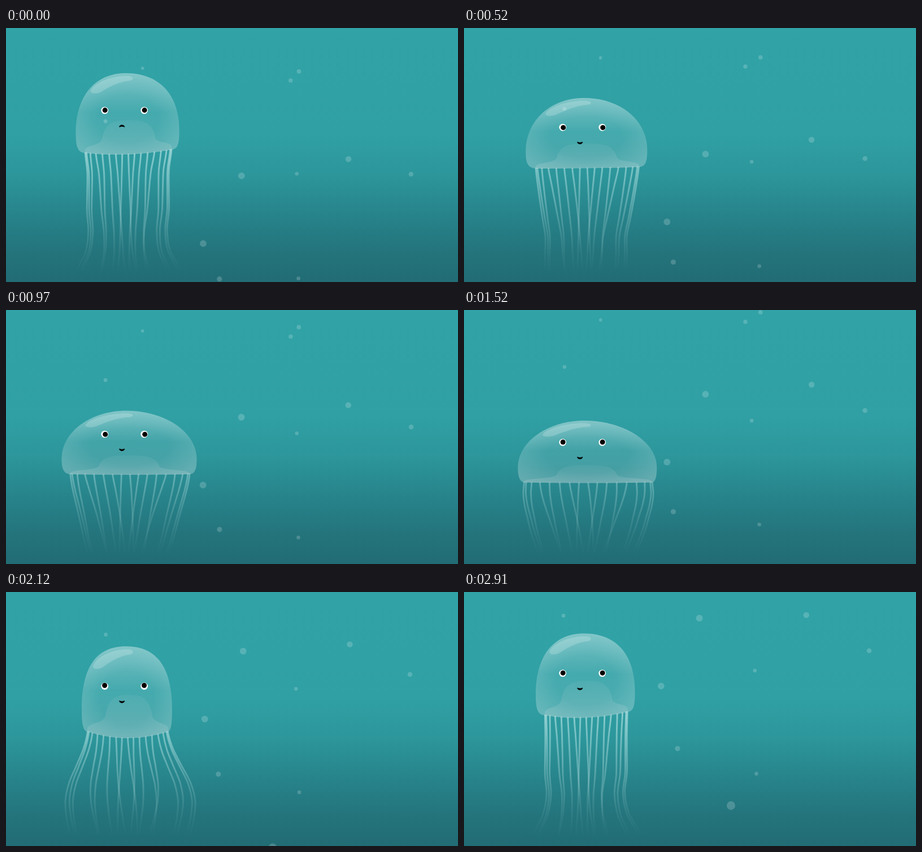
An HTML page that plays this animation: 800x450 px, repeating every 2940 ms.

```html
<!DOCTYPE html>
<html lang="en">
<head>
<meta charset="utf-8">
<title>Jellyfish</title>
<style>
  html, body { margin: 0; width: 100%; height: 100%; overflow: hidden; background: #2f9fa4; }
  svg { display: block; width: 100%; height: 100%; }
</style>
</head>
<body>
<svg viewBox="0 0 800 450">
  <defs>
    <linearGradient id="sea" x2="0" y2="1">
      <stop offset="0" stop-color="#31a3a7"/>
      <stop offset=".42" stop-color="#30a0a4"/>
      <stop offset=".58" stop-color="#2c969b"/>
      <stop offset=".74" stop-color="#27838a"/>
      <stop offset=".88" stop-color="#24747c"/>
      <stop offset="1" stop-color="#226c74"/>
    </linearGradient>
    <linearGradient id="dome" x2="0" y2="1">
      <stop offset="0" stop-color="#fff" stop-opacity=".3"/>
      <stop offset=".2" stop-color="#fff" stop-opacity=".23"/>
      <stop offset=".48" stop-color="#fff" stop-opacity=".1"/>
      <stop offset="1" stop-color="#fff" stop-opacity=".14"/>
    </linearGradient>
    <radialGradient id="rim" cx=".5" cy=".56" r=".58">
      <stop offset=".5" stop-color="#fff" stop-opacity="0"/>
      <stop offset="1" stop-color="#fff" stop-opacity=".15"/>
    </radialGradient>
    <linearGradient id="under" x2="0" y2="1">
      <stop offset="0" stop-color="#f4e8ea" stop-opacity=".05"/>
      <stop offset="1" stop-color="#f4e8ea" stop-opacity=".16"/>
    </linearGradient>
    <linearGradient id="fade" gradientUnits="userSpaceOnUse" x1="0" y1="210" x2="0" y2="435">
      <stop offset="0" stop-color="#d4f4f4" stop-opacity=".55"/>
      <stop offset=".4" stop-color="#d4f4f4" stop-opacity=".32"/>
      <stop offset=".67" stop-color="#d4f4f4" stop-opacity=".15"/>
      <stop offset=".85" stop-color="#d4f4f4" stop-opacity=".05"/>
      <stop offset="1" stop-color="#d4f4f4" stop-opacity="0"/>
    </linearGradient>
  </defs>
  <rect width="800" height="450" fill="url(#sea)"/>
  <g id="tentacles" fill="none" stroke="url(#fade)" stroke-width="2.9"></g>
  <path id="bell" fill="url(#dome)"/>
  <path id="bellRim" fill="url(#rim)"/>
  <path id="arch" fill="url(#under)"/>
  <path id="shine" fill="#fff" fill-opacity=".19"/>
  <g id="bubbles" fill="#fff" fill-opacity=".19"></g>
  <g id="face">
    <circle r="6.3" fill="#fff"/><circle r="6.3" cx="70" fill="#fff"/>
    <g id="pupils"><circle r="4.5"/><circle r="4.5" cx="70"/></g>
    <path id="mouth" stroke="#000" stroke-width=".8" stroke-linejoin="round"/>
  </g>
</svg>
<script>
const LOOP = 2940;
const TURN = 2 * Math.PI;
const $ = id => document.getElementById(id);
const lerp = (a, b, u) => a + (b - a) * u;

function add(parent, tag) {
  return parent.appendChild(document.createElementNS("http://www.w3.org/2000/svg", tag));
}

// One swim stroke: time, top of the bell, its width, height of the eyes
const stroke = [
  [0, 80, 183, 146],
  [520, 124, 215, 176],
  [970, 178.5, 239, 220],
  [1520, 196, 246, 234.6],
  [2120, 96.5, 160, 167],
  [2420, 80, 167, 149.5],
  [2910, 73.5, 175.5, 144]
];
const [TOP, WIDTH, EYE] = [1, 2, 3];

// Periodic cubic through the key poses, with uneven spacing in time.
function sample(column, t) {
  t = (t % LOOP + LOOP) % LOOP;
  const n = stroke.length;
  const key = k => {
    const row = stroke[(k + n) % n];
    return { time: row[0] + Math.floor(k / n) * LOOP, value: row[column] };
  };
  const slope = k => {
    const a = key(k - 1), b = key(k + 1);
    return (b.value - a.value) / (b.time - a.time);
  };
  const i = stroke.findLastIndex(row => row[0] <= t);
  const a = key(i), b = key(i + 1), span = b.time - a.time;
  const u = (t - a.time) / span, w = 1 - u;
  return a.value * (1 + 2 * u) * w * w + b.value * u * u * (3 - 2 * u)
    + span * u * w * (slope(i) * w - slope(i + 1) * u);
}

// Both ends of the fringe where the tentacles hang.
function fringe(t) {
  const width = sample(WIDTH, t);
  const center = 214 + .05 * (width - 160);
  const inset = 14 + 4 * Math.cos(TURN * (t - 400) / LOOP);
  return { left: center - width / 2 + inset, right: center + width / 2 - inset + 3 };
}

// The bell keeps its area nearly constant; when squeezed its hem sags.
function poseAt(t) {
  const top = sample(TOP, t), width = sample(WIDTH, t);
  const center = 214 + .05 * (width - 160);
  const height = (26000 + 14 * (width - 160)) / width;
  const base = top + height;
  const sag = 1 + .26 * Math.max(0, 200 - width);
  const tilt = 3 * Math.max(0, Math.cos(TURN * t / LOOP));
  const { left: rootL, right: rootR } = fringe(t);
  return {
    top, width, height, base, rootL, rootR,
    left: center - width / 2, right: center + width / 2,
    hemL: base - sag + tilt, hemR: base - sag - tilt
  };
}

// Tentacles hang from a ring seen edge-on, so they crowd towards both sides.
const STRANDS = 16, JOINTS = 6, BOTTOM = 430, LAG = 1100;
const across = index => .5 - .5 * Math.cos(Math.PI * index / STRANDS);
const strands = Array.from({ length: STRANDS + 1 }, (_, i) => {
  const gather = Math.sin(TURN * i / STRANDS);
  const root = i + .7 * gather;
  const inner = i % STRANDS ? 1 : 0;
  return {
    from: across(root),
    to: across(root + inner * (.9 * gather + .7 * Math.sin(2.5 * i))),
    path: add($("tentacles"), "path")
  };
});

// Each joint repeats the movement of the fringe a little later.
function drawTentacles(p, t) {
  const spans = Array.from({ length: JOINTS + 1 }, (_, j) =>
    fringe(t - LAG * (j / JOINTS) ** 1.2));
  for (const { from, to, path } of strands) {
    const y0 = lerp(p.hemL, p.hemR, from)
      + 4 * from * (1 - from) * (p.base - (p.hemL + p.hemR) / 2) - 1;
    const x = spans.map((s, j) => lerp(s.left, s.right, lerp(from, to, j / JOINTS)));
    const step = (BOTTOM - y0) / JOINTS;
    let d = `M${x[0]} ${y0}`;
    for (let j = 0; j < JOINTS; j++) {
      const y = y0 + j * step;
      const before = x[Math.max(j - 1, 0)], after = x[Math.min(j + 2, JOINTS)];
      d += `C${x[j] + (x[j + 1] - before) / 6} ${y + step / 3} `
        + `${x[j + 1] - (after - x[j]) / 6} ${y + step * 2 / 3} ${x[j + 1]} ${y + step}`;
    }
    path.setAttribute("d", d);
  }
}

function drawBell(p) {
  const { left, right, top, width, height, base, hemL, hemR, rootL, rootR } = p;
  const cx = 212.5, k = .45 + .22 * height / width;
  const sideL = hemL - .24 * height, sideR = hemR - .24 * height;
  const hem = `Q${(rootL + rootR) / 2} ${2 * base - (hemL + hemR) / 2} ${rootL} ${hemL}`;

  const bell = `M${left} ${sideL}`
    + `C${left} ${lerp(sideL, top, k)} ${lerp(cx, left, k)} ${top} ${cx} ${top}`
    + `C${lerp(cx, right, k)} ${top} ${right} ${lerp(sideR, top, k)} ${right} ${sideR}`
    + `C${right} ${hemR - 9} ${right - 3} ${hemR - 1} ${rootR} ${hemR}${hem}`
    + `C${left + 4} ${hemL - 1} ${left} ${hemL - 9} ${left} ${sideL}Z`;
  $("bell").setAttribute("d", bell);
  $("bellRim").setAttribute("d", bell);

  const half = Math.min(53, .257 * width), ax = 217.5;
  const a = ax - half, b = ax + half;
  const archTop = top + 63 + .14 * height;
  const wing = (hemL - archTop) * .28, mid = lerp(archTop, hemL, .55);
  $("arch").setAttribute("d", `M${rootL} ${hemL}`
    + `C${rootL - 6} ${hemL - wing} ${a - 3} ${hemL - wing * .6} ${a} ${mid}`
    + `C${a + 5} ${archTop + 4} ${a + 20} ${archTop} ${ax} ${archTop}`
    + `C${b - 20} ${archTop} ${b - 5} ${archTop + 4} ${b} ${mid}`
    + `C${b + 3} ${hemR - wing * .6} ${rootR + 6} ${hemR - wing} ${rootR} ${hemR}${hem}Z`);

  const x = left + 20 + .28 * (width - 160);
  const at = (u, v) => `${lerp(x, 225, u)} ${top + 4 + v * .22 * height}`;
  $("shine").setAttribute("d", `M${at(0, .85)}C${at(.08, .4)} ${at(.5, 0)} ${at(.88, .03)}`
    + `C${at(1, .04)} ${at(1.05, .24)} ${at(.92, .29)}`
    + `C${at(.66, .36)} ${at(.45, .62)} ${at(.22, .95)}`
    + `C${at(.13, 1.04)} ${at(-.02, 1.03)} ${at(0, .85)}Z`);
}

function drawFace(t) {
  const swing = Math.sin(TURN * t / LOOP);
  const smile = Math.min(1, t / 200 - 1);
  const y = v => 27.6 + v * smile;
  $("face").setAttribute("transform", `translate(174.7 ${sample(EYE, t)})`);
  $("pupils").setAttribute("transform", `translate(${.5 + .6 * swing} ${.9 * swing - .5})`);
  $("mouth").setAttribute("d",
    `M25.8 ${y(-1.6)}Q30.5 ${y(.6)} 35.2 ${y(-1.6)}C34.6 ${y(2.9)} 26.4 ${y(2.9)} 25.8 ${y(-1.6)}Z`);
}

// x, y at the start, radius, sway; bigger bubbles rise faster
const bubbles = [
  [422.3, 262, 5.93, -5.8], [610.7, 232.3, 5.26, -5], [713.2, 259, 4.26, 4],
  [511.8, 258.3, 3.27, 3], [354.3, 382, 5.92, -5.7], [374, 444.7, 4.6, 4],
  [520.2, 443.7, 3.35, -2.8], [521.7, 77, 3.84, -3.5], [500.8, 93, 3.79, 3.2],
  [241.7, 71.3, 2.82, 0], [177, 165.3, 3.39, -1], [471.5, 653.5, 7.56, 1]
].map(([x, y, r, sway]) => {
  const dot = add($("bubbles"), "circle");
  dot.setAttribute("r", r);
  return { x, y, sway, rise: .0125 * r, dot };
});

function drawBubbles(t) {
  const wave = Math.cos(TURN * t / 1000 + .35);
  for (const { x, y, sway, rise, dot } of bubbles) {
    dot.setAttribute("cx", x + sway * wave);
    dot.setAttribute("cy", y - rise * t);
  }
}

function draw(t) {
  const pose = poseAt(t);
  drawTentacles(pose, t);
  drawBell(pose);
  drawFace(t);
  drawBubbles(t);
}

function tick() {
  draw(performance.now() % LOOP);
  requestAnimationFrame(tick);
}
tick();
</script>
</body>
</html>
```
